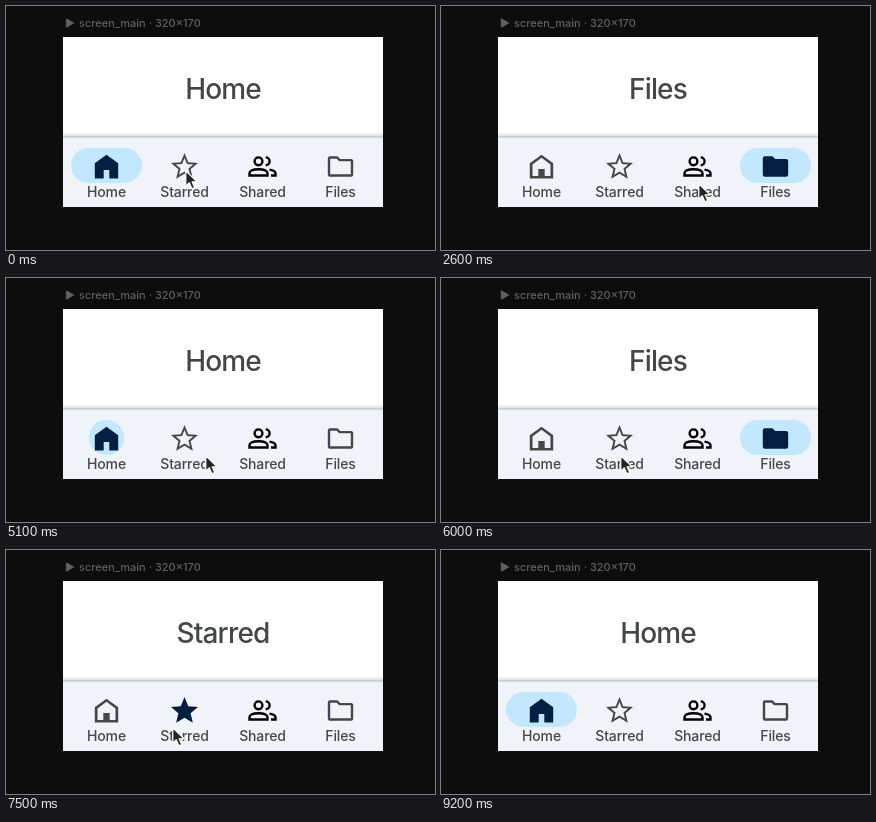
Recreate the animation shown at these times as an HTML page. Size 429 by 244 pixels, loop 9.5 s.

```html
<!DOCTYPE html>
<html lang="en">
<head>
<meta charset="utf-8">
<title>Navigation bar</title>
<style>
  html, body { margin: 0; width: 100%; height: 100%; overflow: hidden; background: #0d0d0d; }
  svg { display: block; width: 429px; height: 244px; font-family: Inter, Roboto, sans-serif; }
  text { fill: #444746; font-weight: 500; text-anchor: middle; }
  .caption { fill: #606060; font-size: 11px; text-anchor: start; }
  .title { font-size: 28px; letter-spacing: -.03em; }
  .label { font-size: 14px; letter-spacing: -.01em; }
  .tab { color: #444746; }
  .tab.shared { color: #000; }
  .tab.on { color: #021e40; }
  .line { fill: none; stroke: currentColor; stroke-width: 2.4; }
  .fill { fill: currentColor; fill-rule: evenodd; }
  .solid, .on .outline { display: none; }
  .on .solid { display: inline; }
</style>
</head>
<body>
<svg viewBox="0 0 429 244">
  <defs>
    <linearGradient id="shade" x1="0" y1="0" x2="0" y2="1">
      <stop offset="0" stop-color="#fff"/>
      <stop offset=".6" stop-color="#e4e4e4"/>
      <stop offset="1" stop-color="#adafb2"/>
    </linearGradient>
  </defs>

  <path d="M60.3 12.8v8.4l7.4-4.2z" fill="#606060" stroke="#606060" stroke-linejoin="round"/>
  <text class="caption" x="73" y="21">screen_main · 320×170</text>

  <rect x="57" y="31" width="320" height="170" fill="#fff"/>
  <rect x="57" y="126" width="320" height="6" fill="url(#shade)"/>
  <rect x="57" y="131.5" width="320" height="69.5" fill="#f0f3f8"/>
  <text id="title" class="title" x="217" y="93">Home</text>
  <rect id="pill" y="142" height="35" fill="#c2e7ff"/>
  <g id="tabs"></g>
  <path id="cursor" d="M.8.9v15.2l3.5-3.3 2.6 6 2.8-1.2-2.6-5.8h5z" fill="#242424" stroke="#fff" stroke-width="1.2" stroke-linejoin="round"/>
</svg>

<script>
const LOOP = 9500, STEP = 100, GROW = 100, TRAVEL = 450, EXIT = 850, LEAD = 25;
const PILL = 71, REST_Y = 177;
const names = ["Home", "Starred", "Shared", "Files"];
const center = i => 100.5 + 78 * i;
const $ = id => document.getElementById(id);

// Five-pointed star around the icon's centre
function star(radius) {
  const points = Array.from({ length: 10 }, (_, i) => {
    const r = i % 2 ? radius * .45 : radius, a = i * Math.PI / 5;
    return [r * Math.sin(a), .8 - r * Math.cos(a)].map(v => v.toFixed(2));
  });
  return `M${points.join("L")}Z`;
}

const path = (cls, d) => `<path class="${cls}" d="${d}"/>`;
const house = "M0-11.8 11.7-3.2V12h-23.4V-3.2z";
const folder = "M-10.5-9h7l2.6 2.6h11.4q1 0 1 1V8q0 1-1 1h-21q-1 0-1-1V-8q0-1 1-1z";
const person = "M-4-9.1a3.9 3.9 0 0 1 0 7.8a3.9 3.9 0 0 1 0-7.8zM-13 9V6.8q0-4 9-4t9 4V9z";
const behind = path("line", "M3.2-9.1a3.9 3.9 0 0 1 0 7.8M7 3.1q6 1 6 3.7V9H8.5");

// Each tab: resting icon, active icon
const icons = [
  [path("fill", house + "M0-8.7-9-2V9.6H9V-2zM-3.2 2.4h6.4V9.6h-6.4z"), path("fill", house + "M-2.8 3.6h5.6V12h-5.6z")],
  [path("fill", star(14.2) + star(9.2)), path("fill", star(14.2))],
  [behind + path("line", person), behind + path("line", person) + path("fill", person)],
  [path("line", folder), path("line", folder) + path("fill", folder)]
];

// The tour: [time of click, tab]
const clicks = [
  [-GROW, 0], [450, 1], [1350, 2], [2050, 3], [2850, 2], [3350, 1],
  [3934, 0], [4450, 1], [5050, 0], [5650, 3], [7500, 1], [8350, 0]
];

$("tabs").innerHTML = names.map((name, i) => {
  const x = center(i), [outline, solid] = icons[i];
  return `<g class="tab ${name.toLowerCase()}">
    <g transform="translate(${x} 160.5)"><g class="outline">${outline}</g><g class="solid">${solid}</g></g>
    <text class="label" x="${x}" y="191">${name}</text></g>`;
}).join("");
const tabs = [...$("tabs").children];

const clamp = p => Math.max(0, Math.min(1, p));
const easeOut = p => 1 - (1 - p) ** 3;

// Where the pointer waits for a click; after the last one it leaves at the top
function stop(i) {
  if (i <= 1) return [179, 164];
  return i < clicks.length ? [center(clicks[i][1]), REST_Y] : [150, -26];
}

function pointerAt(t) {
  const i = clicks.findLastIndex(c => c[0] - LEAD <= t);
  const time = i === clicks.length - 1 ? EXIT : TRAVEL;
  const p = easeOut(clamp((t - clicks[i][0] + LEAD) / time));
  const from = stop(i), to = stop(i + 1);
  return from.map((v, k) => Math.round(v + (to[k] - v) * p));
}

function draw(t) {
  const [since, active] = clicks.findLast(c => c[0] <= t);
  const width = PILL * clamp((t - since) / GROW);
  const pill = $("pill");
  pill.setAttribute("x", center(active) - width / 2);
  pill.setAttribute("width", width);
  pill.setAttribute("rx", Math.min(17.5, width / 2));
  $("title").textContent = names[active];
  tabs.forEach((tab, i) => tab.classList.toggle("on", i === active));
  $("cursor").setAttribute("transform", `translate(${pointerAt(t)})`);
}

// The screen refreshes ten times a second
function tick() {
  const t = performance.now() % LOOP;
  draw(Math.floor(t / STEP) * STEP);
  requestAnimationFrame(tick);
}
tick();
</script>
</body>
</html>
```
